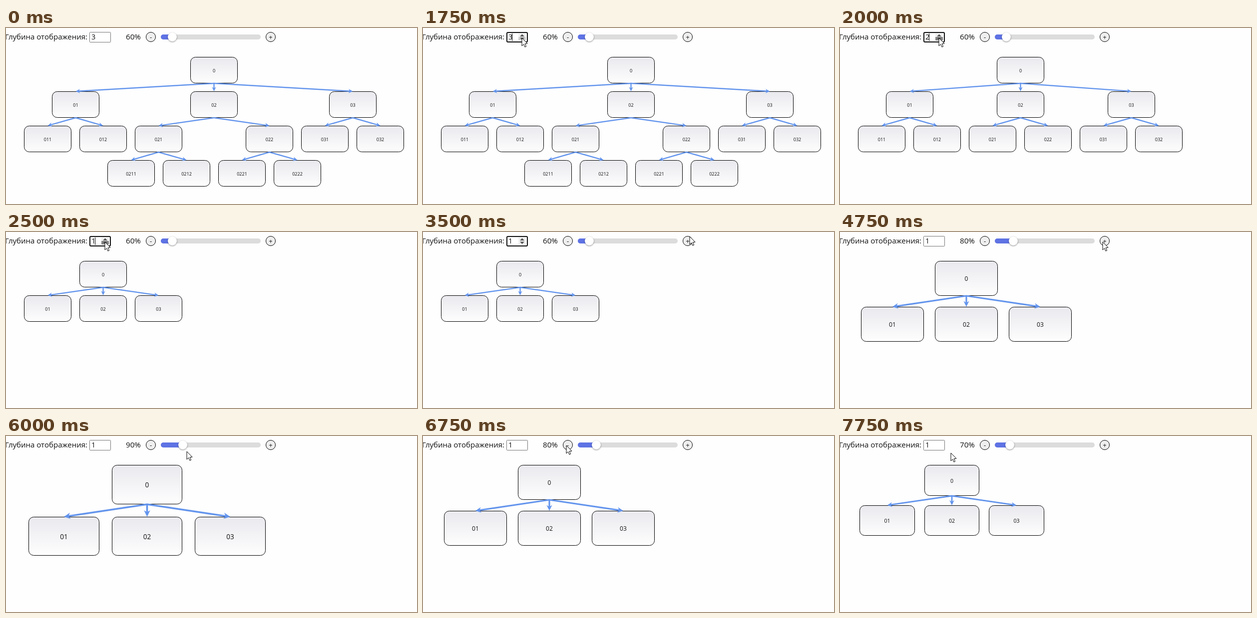
These frames come from a looping animation (823 px wide and 353 px high, 8 s). An HTML page with a canvas:

```html
<!DOCTYPE html>
<html lang="ru">
<head>
<meta charset="utf-8">
<title>Дерево</title>
<style>
html, body { margin: 0; width: 100%; height: 100%; overflow: hidden; background: #fefefe; }
canvas { display: block; }
</style>
</head>
<body>
<canvas id="stage" width="823" height="353"></canvas>
<script>
const ctx = document.getElementById('stage').getContext('2d');
const LOOP = 8000, STEP = 250;
const FONT = '"Open Sans", "Noto Sans", sans-serif';

// Each entry changes only the fields it lists.
const timeline = [
  [0, { depth: 3, zoom: 60, cursor: null, hover: false, focus: false, caret: false, press: false }],
  [250, { cursor: [288, 203] }],
  [500, { cursor: [250, 138] }],
  [750, { cursor: [214, 70] }],
  [1000, { cursor: [198, 20], hover: true }],
  [1500, { focus: true, caret: true }],
  [2000, { depth: 2, press: true }],
  [2500, { depth: 1 }],
  [2750, { press: false }],
  [3000, { cursor: [290, 20], hover: false, caret: false }],
  [3250, { cursor: [450, 13], caret: true }],
  [3500, { cursor: [534, 9], caret: false }],
  [3750, { cursor: [526, 20] }],
  [4000, { zoom: 70, focus: false }],
  [4750, { zoom: 80 }],
  [5250, { zoom: 90 }],
  [5500, { cursor: [500, 24] }],
  [5750, { cursor: [432, 30] }],
  [6000, { cursor: [362, 31] }],
  [6250, { cursor: [302, 23] }],
  [6500, { cursor: [287, 19], zoom: 80 }],
  [7000, { zoom: 70 }],
  [7500, { cursor: [256, 27] }],
  [7750, { cursor: [222, 34] }]
];

function stateAt(t) {
  const s = {};
  for (const [time, change] of timeline) if (time <= t) Object.assign(s, change);
  return s;
}

const node = (id, ...kids) => ({ id, kids });
const tree = node('0',
  node('01', node('011'), node('012')),
  node('02',
    node('021', node('0211'), node('0212')),
    node('022', node('0221'), node('0222'))),
  node('03', node('031'), node('032')));

// Packs subtrees side by side as close as every level allows;
// parents sit midway over their children.
function layout(root, depth) {
  const links = [];
  function build(n, level) {
    const item = { id: n.id, col: 0, level };
    const items = [item], free = [];
    const kids = level < depth ? n.kids : [];
    const heads = kids.map(k => {
      const sub = build(k, level + 1);
      const shift = Math.max(...sub.map(i => (free[i.level] || 0) - i.col));
      for (const i of sub) {
        i.col += shift;
        free[i.level] = Math.max(free[i.level] || 0, i.col + 1);
      }
      items.push(...sub);
      links.push([item, sub[0]]);
      return sub[0];
    });
    if (heads.length) item.col = (heads[0].col + heads[heads.length - 1].col) / 2;
    return items;
  }
  return { nodes: build(root, 0), links };
}

const snap = v => Math.ceil(v - 1e-6);

function box(n, s) {
  const x = 18 + (30 + Math.round(n.col * 185)) * s, y = 58 + n.level * 115 * s;
  const left = snap(x), top = snap(y);
  return { left, top, w: snap(x + 157.2 * s) - left, h: snap(y + 87.2 * s) - top };
}

function shape(x, y, w, h, r, fill, stroke, line = 1) {
  ctx.beginPath();
  ctx.roundRect(x, y, w, h, r);
  if (fill) { ctx.fillStyle = fill; ctx.fill(); }
  if (stroke) { ctx.strokeStyle = stroke; ctx.lineWidth = line; ctx.stroke(); }
}

function poly(points, fill, stroke) {
  ctx.beginPath();
  points.forEach(([x, y]) => ctx.lineTo(x, y));
  ctx.closePath();
  if (fill) { ctx.fillStyle = fill; ctx.fill(); }
  if (stroke) { ctx.strokeStyle = stroke; ctx.lineWidth = 1; ctx.stroke(); }
}

function text(str, x, y, size, align = 'left') {
  ctx.font = `${size}px ${FONT}`;
  ctx.textAlign = align;
  ctx.fillStyle = '#111';
  ctx.fillText(str, x, y);
}

function drawBox(n, s) {
  const b = box(n, s);
  const g = ctx.createLinearGradient(0, b.top, 0, b.top + b.h);
  g.addColorStop(0, '#e9e9ee');
  g.addColorStop(1, '#fefefe');
  shape(b.left + .5, b.top + .5, b.w - 1, b.h - 1, 10, g, '#000');
  const size = 15.1 * s;
  text(n.id, b.left + b.w / 2, b.top + b.h / 2 + 1 + size * .357, size, 'center');
}

function drawLink([from, to], s) {
  const a = box(from, s), b = box(to, s);
  const x1 = a.left + a.w / 2, y1 = a.top + a.h;
  const x2 = b.left + b.w / 2, y2 = b.top;
  const len = Math.hypot(x2 - x1, y2 - y1);
  ctx.save();
  ctx.translate(x2, y2);
  ctx.rotate(Math.atan2(y2 - y1, x2 - x1));
  ctx.strokeStyle = '#6495ed';
  ctx.lineWidth = 4 * s;
  ctx.beginPath();
  ctx.moveTo(-len, 0);
  ctx.lineTo(-8 * s, 0);
  ctx.stroke();
  const l = 14.5 * s, w = 7 * s;
  poly([[0, 0], [-l, -w], [-l * .7, 0], [-l, w]], '#6495ed');
  ctx.restore();
}

function drawInput(s) {
  if (s.focus) shape(168, 9, 41, 19, 2, '#fff', '#101010', 2);
  else shape(167.5, 8.5, 42, 20, 1, '#fff', s.hover ? '#4f4f4f' : '#767676');
  text(String(s.depth), 171, 23, 14.4);
  if (s.caret) {
    ctx.fillStyle = '#000';
    ctx.fillRect(178, 11, 1, 15);
  }
  if (s.hover || s.focus) {
    ctx.fillStyle = '#efefef';
    ctx.fillRect(191, 11, 15, 14);
    if (s.hover) {
      ctx.fillStyle = s.press ? '#848484' : '#d0d0d0';
      ctx.fillRect(191, 18, 15, 7);
    }
    poly([[194, 17], [198.5, 12.5], [203, 17]], '#505050');
    poly([[194, 19.5], [198.5, 24], [203, 19.5]], '#505050');
  }
}

function drawButton(x, sign) {
  ctx.beginPath();
  ctx.arc(x, 18, 9.5, 0, Math.PI * 2);
  ctx.fillStyle = '#efefef';
  ctx.fill();
  ctx.strokeStyle = '#000';
  ctx.lineWidth = 1;
  ctx.stroke();
  text(sign, x, 22.5, 13, 'center');
}

function drawSlider(zoom) {
  const x = 319 + 182 * (zoom - 40) / 260;
  shape(310, 13, 200, 10, 5, '#dcdcdc');
  shape(310, 13, x - 310, 10, [5, 0, 0, 5], '#5e72e4');
  ctx.save();
  ctx.shadowColor = 'rgba(0,0,0,.45)';
  ctx.shadowBlur = 3;
  ctx.shadowOffsetY = 1;
  ctx.beginPath();
  ctx.arc(x, 18, 9, 0, Math.PI * 2);
  ctx.fillStyle = '#fff';
  ctx.fill();
  ctx.restore();
}

function drawCursor([x, y]) {
  ctx.save();
  ctx.translate(x, y);
  poly([[0, 0], [0, 16], [3.6, 12.6], [6, 18.2], [8.6, 17], [6.2, 11.6], [11, 11.2]], '#fff', '#000');
  ctx.restore();
}

function draw(t) {
  const s = stateAt(Math.floor(t / STEP) * STEP);
  ctx.fillStyle = '#fefefe';
  ctx.fillRect(0, 0, 823, 353);
  text('Глубина отображения:', 163, 23, 15, 'right');
  drawInput(s);
  text(s.zoom + '%', 240, 23, 15.2);
  drawButton(290, '-');
  drawSlider(s.zoom);
  drawButton(530, '+');

  const k = s.zoom / 100;
  const { nodes, links } = layout(tree, s.depth);
  nodes.forEach(n => drawBox(n, k));
  links.forEach(l => drawLink(l, k));
  if (s.cursor) drawCursor(s.cursor);
}

const start = performance.now();
function tick() {
  draw((performance.now() - start) % LOOP);
  requestAnimationFrame(tick);
}
tick();
</script>
</body>
</html>
```
